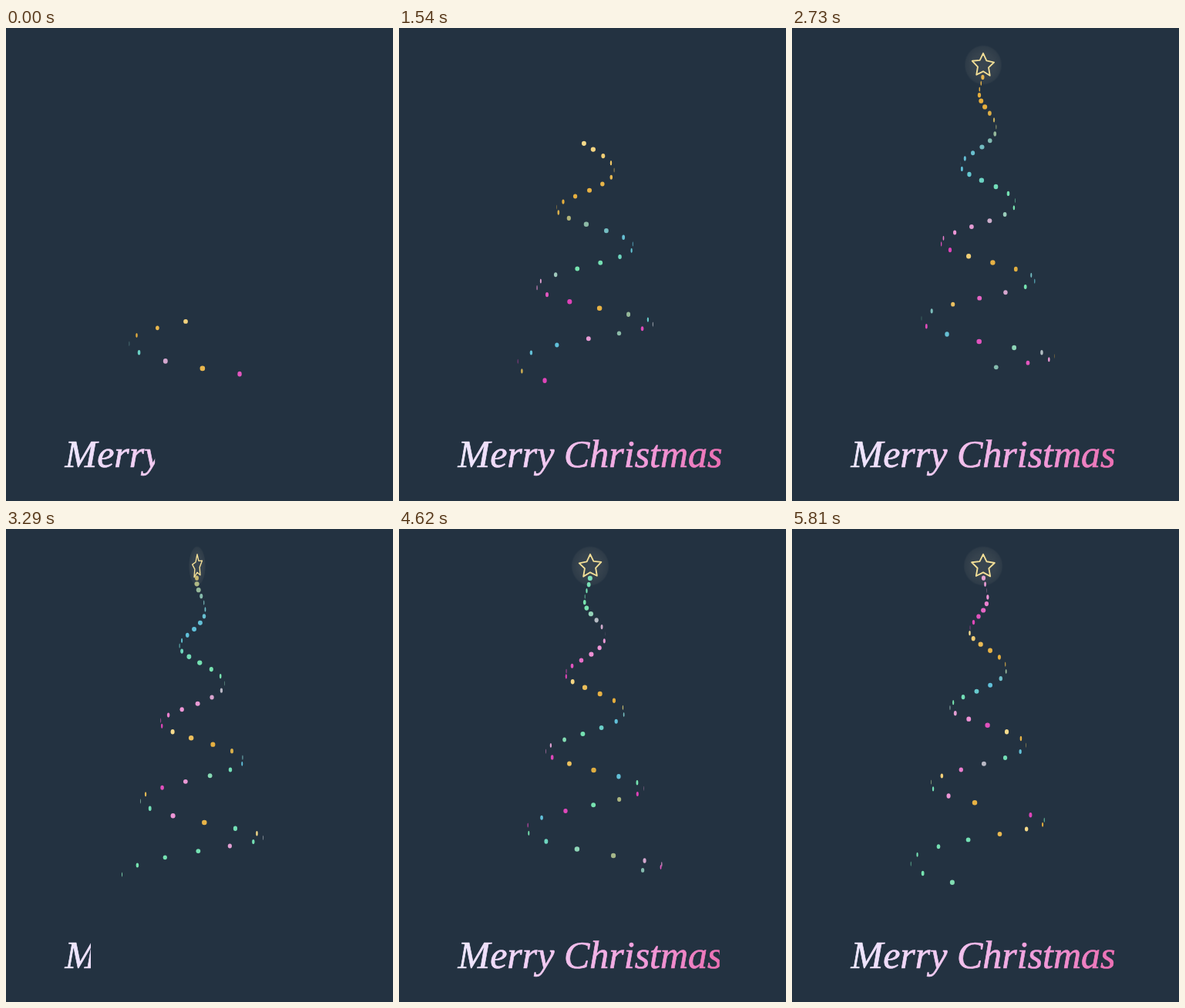
These frames come from a looping animation (502x614 px, 5.88 s). An HTML page with a canvas:

```html
<!DOCTYPE html>
<html lang="en">
<head>
<meta charset="utf-8">
<title>Merry Christmas</title>
<style>
  html, body { margin: 0; width: 100%; height: 100%; overflow: hidden; background: #233241; }
  canvas { display: block; }
</style>
</head>
<body>
<canvas id="stage" width="502" height="614"></canvas>
<script>
const ctx = document.getElementById('stage').getContext('2d');
const TAU = 2 * Math.PI;
const LOOP = 5880, TICK = 70, TURN = 2100;
const CX = 248, EYE = 307, DEPTH = 1450;
const DOTS = 49, DELAY = 52.5, LEAD = 502.5;
const PALETTE = [[246, 220, 142], [229, 173, 60], [96, 192, 218], [119, 228, 175], [238, 150, 214], [222, 66, 184]];

const text = ctx.createLinearGradient(77, 0, 419, 0);
text.addColorStop(0, '#eee9ff');
text.addColorStop(.4, '#f2c3ee');
text.addColorStop(.7, '#f29ddc');
text.addColorStop(1, '#ec6fb3');

// CSS "ease" timing curve
function ease(x) {
  let lo = 0, hi = 1, s;
  for (let n = 0; n < 14; n++) {
    s = (lo + hi) / 2;
    const cx = .75 * s * (1 - s) + s ** 3;
    if (cx < x) lo = s; else hi = s;
  }
  return .3 * s * (1 - s) ** 2 + 3 * s * s * (1 - s) + s ** 3;
}

function colorAt(phase) {
  const p = (phase % 1) * 5, n = Math.floor(p), e = ease(p - n);
  return `rgb(${PALETTE[n].map((c, k) => Math.round(c + (PALETTE[n + 1][k] - c) * e))})`;
}

function project(x, y, z) {
  const k = DEPTH / (DEPTH - z);
  return { x: CX + x * k, y: EYE + (y - EYE) * k, k };
}

function drawDot(i, t) {
  const delay = (DOTS - i) * DELAY, time = t + LEAD;
  // each dot blinks off briefly after ten times its delay
  const blink = time - 10 * delay;
  if (time < delay || (blink > -55 && blink < 18)) return;
  const a = (119.1 + i * 28.8) * TAU / 360 + t / TURN * TAU;
  const r = 2.03 * (i + .4);
  const p = project(r * Math.sin(a), 63.8 + 8.03 * i, r * Math.cos(a));
  const facing = Math.abs(Math.cos(a) - r * p.k / DEPTH * Math.sin(a) ** 2);
  const size = 3.1 * p.k;
  ctx.fillStyle = colorAt((time / delay - 1) / 2);
  ctx.beginPath();
  ctx.ellipse(p.x, p.y, size * facing, size, 0, 0, TAU);
  ctx.fill();
}

function drawStar(t) {
  const alpha = Math.min(1, Math.max(0, (t - 2120) / 300));
  if (!alpha) return;
  const a = t / TURN * TAU + .02, sin = Math.sin(a), cos = Math.cos(a);
  ctx.save();
  ctx.globalAlpha = alpha;

  ctx.save();
  ctx.translate(CX, 48);
  ctx.scale(Math.max(.02, Math.abs(sin)), 1);
  const glow = ctx.createRadialGradient(0, 0, 0, 0, 0, 26);
  glow.addColorStop(0, 'rgba(255,240,210,.1)');
  glow.addColorStop(.6, 'rgba(255,240,210,.085)');
  glow.addColorStop(.92, 'rgba(255,240,210,.05)');
  glow.addColorStop(1, 'rgba(255,240,210,0)');
  ctx.fillStyle = glow;
  ctx.fillRect(-26, -26, 52, 52);
  ctx.restore();

  ctx.beginPath();
  for (let n = 0; n < 10; n++) {
    const b = n * TAU / 10, r = n % 2 ? 7.8 : 15.7;
    const w = r * Math.sin(b);
    const p = project(w * sin, 48.5 - r * Math.cos(b), w * cos);
    ctx.lineTo(p.x, p.y);
  }
  ctx.closePath();
  ctx.strokeStyle = '#f3df97';
  ctx.lineWidth = 1 + .9 * Math.abs(sin);
  ctx.lineJoin = 'round';
  ctx.stroke();
  ctx.restore();
}

function drawText(t) {
  ctx.save();
  ctx.beginPath();
  ctx.rect(70, 520, 7 + (t + 505) % 3652 * .23, 75);
  ctx.clip();
  ctx.font = 'italic 50px "Liberation Serif", "Times New Roman", serif';
  ctx.fillStyle = ctx.strokeStyle = text;
  ctx.lineWidth = .7;
  ctx.fillText('Merry Christmas', 76.5, 569.7);
  ctx.strokeText('Merry Christmas', 76.5, 569.7);
  ctx.restore();
}

function frame(now) {
  const t = Math.floor(now % LOOP / TICK) * TICK;
  ctx.fillStyle = '#233241';
  ctx.fillRect(0, 0, 502, 614);
  for (let i = 0; i < DOTS; i++) drawDot(i, t);
  drawStar(t);
  drawText(t);
}

const start = performance.now();
function run() {
  frame(performance.now() - start);
  requestAnimationFrame(run);
}
run();
</script>
</body>
</html>
```
